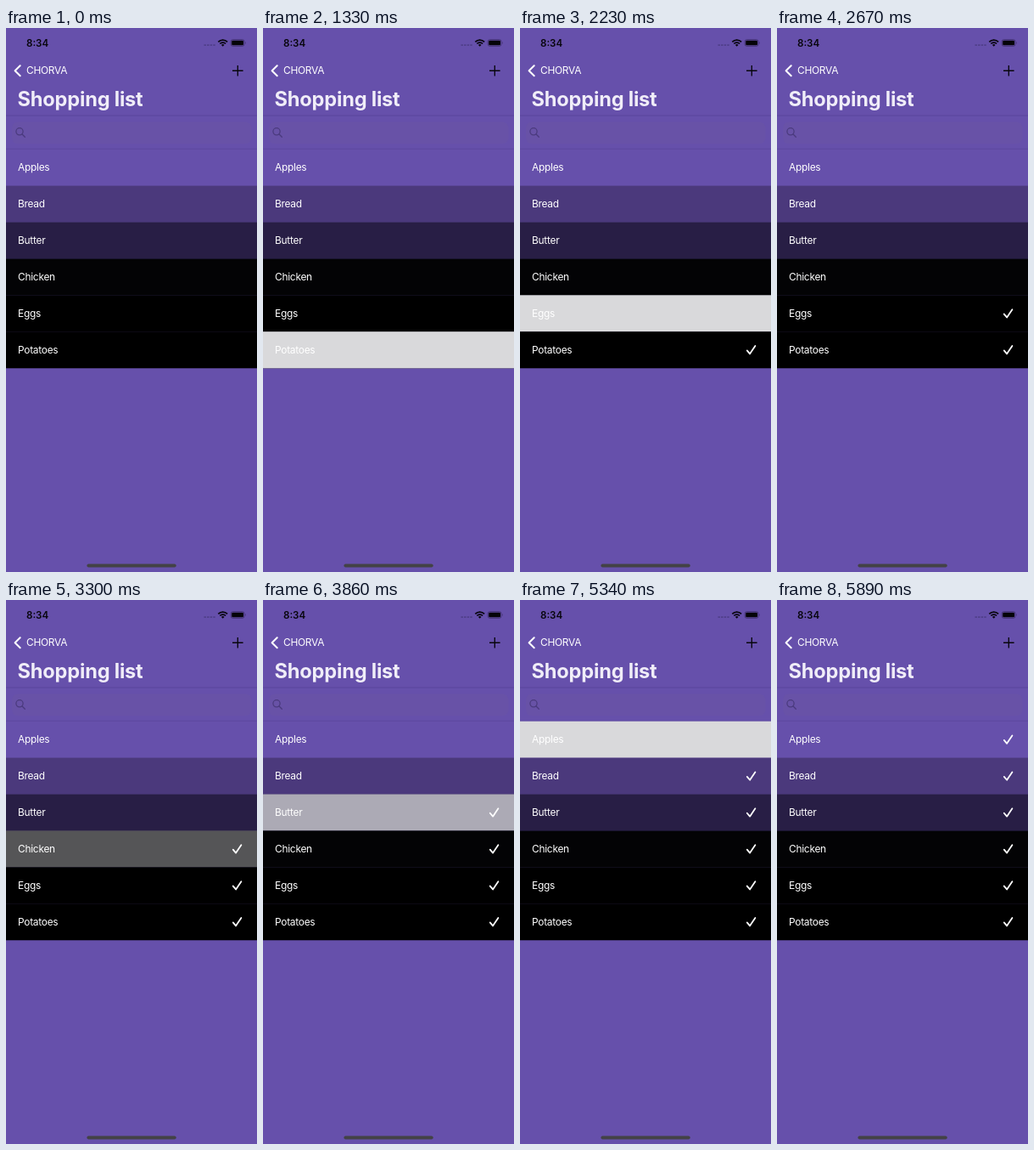
Write an HTML page that moves like this. It is 296 by 640 pixels and loops after 5990 ms.

```html
<!DOCTYPE html>
<html lang="en">
<head>
<meta charset="utf-8">
<title>Shopping list</title>
<style>
  html, body { margin: 0; width: 100%; height: 100%; overflow: hidden; background: #6650ab; }
  svg { display: block; width: 296px; height: 640px; }
  text { font-family: Inter, Roboto, sans-serif; font-size: 11.9px; letter-spacing: -.25px; fill: #fff; }
  .title { font-size: 23.6px; font-weight: 700; letter-spacing: -.2px; fill: #f0edf8; }
  .clock { font-size: 11.6px; font-weight: 600; letter-spacing: 0; fill: #08060d; }
  .line { fill: none; stroke-linecap: round; stroke-linejoin: round; }
</style>
</head>
<body>
<svg id="stage" viewBox="0 0 296 640">
  <rect width="296" height="640" fill="#6650ab"/>

  <!-- status bar -->
  <text class="clock" x="24" y="21.7">8:34</text>
  <path d="M233.5 20.2H247" stroke="#503f8a" stroke-width="1.8" stroke-dasharray="2.4 1.2"/>
  <g class="line" stroke="#08060d" stroke-width="1.7" style="stroke-linecap:butt">
    <path d="M250.3 16.3a7.6 7.6 0 0 1 10.8 0M252.3 18.5a4.8 4.8 0 0 1 6.8 0"/>
  </g>
  <path d="M255.7 21.8l-1.8-1.9a2.6 2.6 0 0 1 3.6 0z" fill="#08060d"/>
  <rect x="265.2" y="13.7" width="15.8" height="7.6" rx="2.2" fill="none" stroke="#3b2d66" stroke-width=".8"/>
  <rect x="266.2" y="14.7" width="13.8" height="5.6" rx="1.3" fill="#050408"/>
  <path d="M282 16.1q1.2 1.4 0 2.8z" fill="#3b2d66"/>

  <!-- navigation bar -->
  <path class="line" d="M16.7 44.2L10.6 50.2L16.7 56.3" stroke="#fff" stroke-width="2"/>
  <text x="24" y="54.3">CHORVA</text>
  <path d="M267 50.2H279.6M273.3 43.9V56.5" stroke="#08060d" stroke-width="1.35"/>
  <text class="title" x="13.6" y="91.6">Shopping list</text>

  <!-- search field -->
  <path d="M0 103H296M0 142.3H296" stroke="#57439a" stroke-width=".9"/>
  <rect x="7" y="110.5" width="282.5" height="25.7" rx="7" fill="#6852a7"/>
  <g class="line" stroke="#4b3b7e" stroke-width="1.3">
    <circle cx="16" cy="121.8" r="4.1"/>
    <path d="M19.1 125L22.3 128.3"/>
  </g>

  <g id="rows"></g>
  <rect x="95.4" y="630.4" width="105.3" height="4" rx="2" fill="#434246"/>
</svg>
<script>
const LOOP = 5990, STEP = 110, ROW = 42.9, TOP = 142.7;
// highlight strength by steps left until the tap has faded out
const FADE = [0, .1, .385, .75, 1, 1];
// name, row colour, tap start, fade end
const items = [
  ['Apples', '#6650ab', 5340, 5890],
  ['Bread', '#4b397c', 4440, 4960],
  ['Butter', '#281e45', 3640, 4090],
  ['Chicken', '#030305', 2970, 3510],
  ['Eggs', '#000', 2230, 2670],
  ['Potatoes', '#000', 1330, 1850]
];

const list = document.getElementById('rows');
list.innerHTML = items.map(([name, color], i) => {
  const y = TOP + i * ROW, mid = y + ROW / 2;
  const box = `x="0" y="${y}" width="296" height="${ROW + .2}"`;
  return `<g><rect ${box} fill="${color}"/>
    <rect class="glow" ${box} fill="#d9d9db"/>
    <text x="14" y="${mid + 4.3}">${name}</text>
    <path class="line check" d="M267.8 ${mid + .8}l3.3 3.9l6.3-9.3" stroke="#fff" stroke-width="1.8"/></g>`;
}).join('');

const rows = [...list.children].map(g => ({
  glow: g.querySelector('.glow'),
  check: g.querySelector('.check')
}));

function draw(now) {
  const t = now % LOOP;
  items.forEach(([, , start, end], i) => {
    const left = Math.max(0, Math.ceil((end - t) / STEP));
    const tapped = t >= start;
    rows[i].glow.style.opacity = tapped ? FADE[left] : 0;
    rows[i].check.style.opacity = tapped && left <= 3 ? 1 : 0;
  });
}

const begin = performance.now();
function tick() {
  draw(performance.now() - begin);
  requestAnimationFrame(tick);
}
tick();
</script>
</body>
</html>
```
